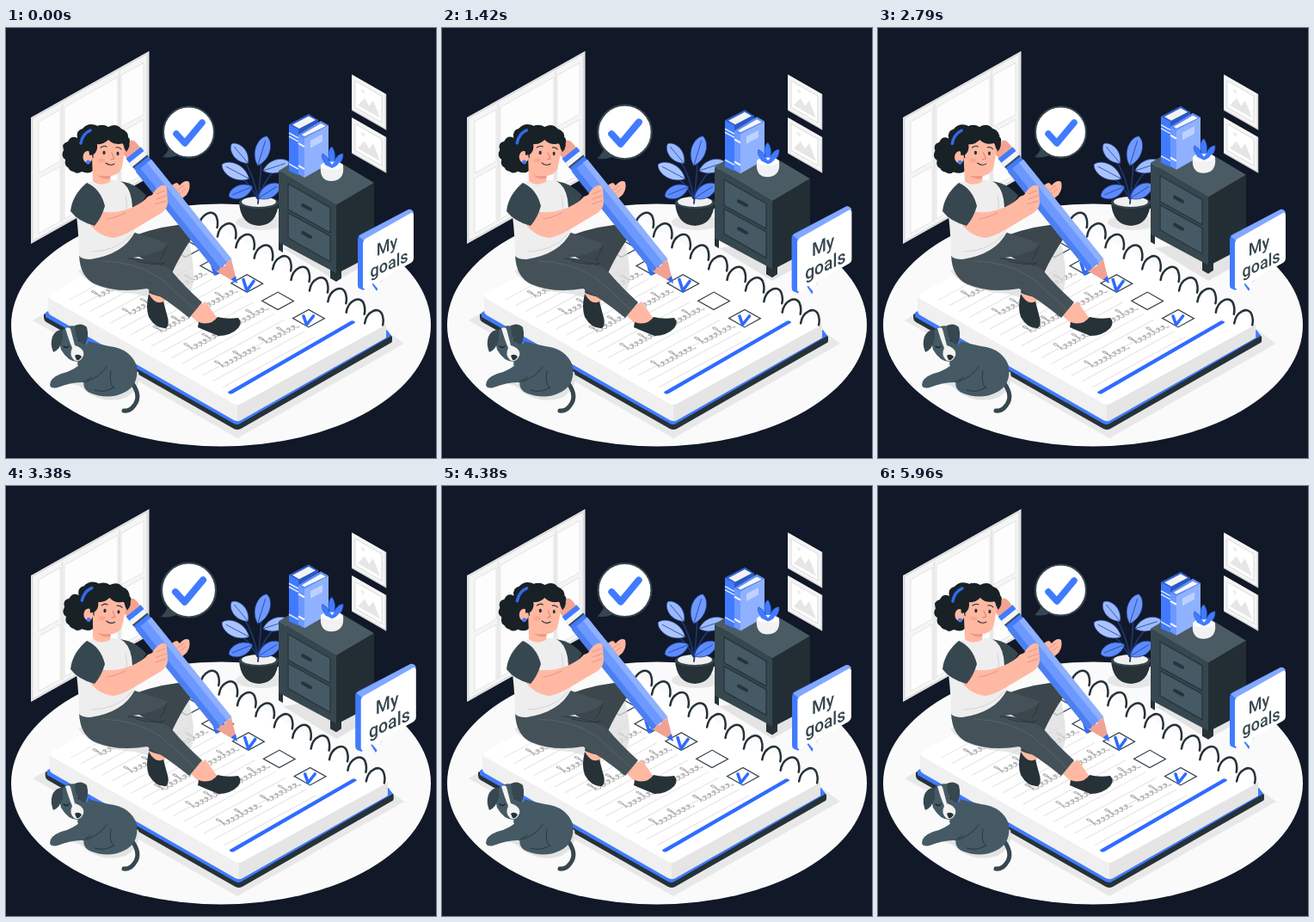
An HTML page that plays this animation: 500x500 px, repeating every 6000 ms.

```html
<!DOCTYPE html>
<html lang="en">
<head>
<meta charset="utf-8">
<title>My goals</title>
<style>
html, body { margin: 0; height: 100%; overflow: hidden; background: #111827; }
svg { display: block; width: 100vw; height: 100vh; }
.ln { fill: none; stroke-linecap: round; stroke-linejoin: round; }
.ink { fill: #263238; }
.slate { fill: #37474f; }
.skin { fill: #ffb9a3; }
.blue { fill: #407bff; }
.soft { fill: #ececec; }
.hair { fill: #182126; }
.dog { fill: #455a64; }
</style>
</head>
<body>
<svg viewBox="0 0 500 500">
  <ellipse cx="250" cy="345.500" rx="244" ry="141" fill="#fafafa"/>

  <!-- window -->
  <g transform="matrix(1 -.562 0 1 29 104)">
    <rect width="137.500" height="147" fill="#e3e3e3"/>
    <rect x="2" y="2" width="133" height="143" fill="#f5f5f5" stroke="#d2d2d2" stroke-width=".7"/>
    <g fill="#fdfdfd" stroke="#dedede" stroke-width=".8">
      <rect x="9" y="10" width="25" height="60"/><rect x="9" y="76" width="25" height="64"/>
      <rect x="39" y="10" width="62" height="130"/>
      <rect x="105" y="10" width="26" height="60"/><rect x="105" y="76" width="26" height="64"/>
    </g>
    <path d="M36.500 4v138M103 4v138" stroke="#e6e6e6" stroke-width="2"/>
  </g>

  <!-- wall pictures -->
  <defs>
    <g id="photo">
      <rect width="39.500" height="41" rx="1" fill="#f5f5f5"/>
      <path d="M0 41h39.500V0" fill="none" stroke="#d8d8d8" stroke-width="1.500"/>
      <rect x="4" y="5" width="31" height="31" fill="#fff" stroke="#dadada"/>
      <path d="M7 32l8-13 5 6 5-9 8 16z" fill="#e6e6e6"/><circle cx="13" cy="12" r="2" fill="#ececec"/>
    </g>
    <path id="ring" class="ln" d="M-11 6C-9-8 5-14 9-5C11 0 11 4 10 8" stroke="#263238" stroke-width="2.500"/>
  </defs>
  <use href="#photo" transform="matrix(1 .57 0 1 402 54)"/>
  <use href="#photo" transform="matrix(1 .57 0 1 402 104)"/>

  <!-- plant -->
  <ellipse cx="296" cy="226" rx="29" ry="9" fill="#e6e6e6"/>
  <path class="ink" d="M271 203Q273 229 294 230Q315 229 317 203z"/>
  <ellipse cx="294" cy="203" rx="23" ry="7" fill="#37474f"/>
  <ellipse cx="294" cy="202" rx="20" ry="6" fill="#f0f0f0"/>
  <path class="ln" d="M293 204Q296 175 297 152M293 199Q288 170 276 153M292 198Q285 182 270 171M294 198Q299 178 313 165" stroke="#1d3570" stroke-width="1.800"/>
  <g id="leaves" stroke="#1f3c86" stroke-width=".7"></g>

  <!-- cabinet, books and succulent -->
  <path d="M322 256L384 294L450 257L428 240z" fill="#e4e4e4"/>
  <g id="cabinet">
    <path class="ink" d="M317 245v13l5 3V250zM377 280v11l7 4 6-4V280zM422 255v14l6-3V250z"/>
    <path fill="#4a5b64" d="M317 166L361 140L428 180L384 206z"/>
    <path fill="#37474f" d="M317 166L384 206V285L317 249z"/>
    <path fill="#232e34" d="M384 206L428 180V263L384 286z"/>
    <g fill="#455a64" stroke="#27343a" stroke-width="1.300">
      <path d="M328 181L377 209V238L328 211z"/><path d="M328 215L377 242V272L328 244z"/>
    </g>
    <path class="ln" d="M345 206l9 5M345 238l9 5" stroke="#27343a" stroke-width="4"/>

    <path fill="#2e5ed2" d="M329 112L352 100L363 107L341 119z"/>
    <path fill="#f3f3f3" d="M333 112.500L352 102.500L360 107L341 117z"/>
    <path class="blue" d="M329 112L340 118V171L329 166z"/>
    <path fill="#2c58c4" d="M340 118L363 106V160L340 171z"/>
    <path d="M329 122l11 6M329 126l11 6M329 158l11 6" stroke="#dce7ff" stroke-width="1.500"/>
    <path fill="#5f8ff8" d="M340 124L366 108L375 113L347 128z"/>
    <path fill="#f7f7f7" d="M344 124L366 111L372 114L347 126z"/>
    <path fill="#6d98ff" d="M340 124L347 128V174L340 170z"/>
    <path fill="#8fb1ff" d="M347 128L375 113V158L347 174z"/>
    <path d="M340 134l7 4M340 160l7 4" stroke="#fff" stroke-width="2"/>
    <path fill="#bed2ff" d="M354 131L368 123.500V132L354 139.500z"/>

    <path class="blue" stroke="#2450b8" stroke-width=".6" d="M374 161Q365 151 368 146Q374 149 376 155Q373 141 379 138Q384 145 382 154Q386 146 392 146Q393 154 384 162z"/>
    <path fill="#f2f2f2" d="M366 160Q364 178 379 178Q394 177 392 160z"/>
    <ellipse cx="379" cy="160" rx="13" ry="4.500" fill="#fff"/>
    <path class="blue" d="M371 159Q368 153 371 152Q377 155 379 159Q383 153 388 153Q388 160 379 163z"/>
  </g>

  <!-- notebook -->
  <path fill="#e8e8e8" d="M31 340L62 322L440 350L463 367L269 477z"/>
  <g id="book">
    <path class="ink" d="M44 333L60 325L440 349L449 359V364Q449 366 446 367L273 466Q269 468 265 466L47 342Q44 340 44 337z"/>
    <path class="blue" d="M46 331L60 322L443 351L448 358L272 460Q269 462 265 460L46 336z"/>
    <path fill="#f0f0f0" d="M49 312V329Q49 332 52 334L265 456Q269 458 273 456L442 360V343z"/>
    <path fill="#e5e5e5" d="M269 436V457.500L273 456L442 360V343z"/>
    <path fill="#fff" d="M53 308L217 220Q222 217 227 220L440 340Q444 343 440 346L273 437Q269 439 265 437L52 315Q47 312 53 308z"/>
    <g id="page" transform="matrix(.878 -.477 .87 .494 49 312)"></g>
    <g class="ln" stroke="#2f6bff" stroke-width="3.600">
      <path d="M346 335l3.500 10 8-10"/><path d="M276 292.500l4 13 8-11"/><path d="M239 273l4 13 8-9"/>
    </g>
    <g id="rings"></g>
  </g>

  <!-- woman -->
  <path d="M84 282Q100 306 150 309L182 318L170 298L215 305Q222 290 213 250z" fill="#dcdcdc" opacity=".75"/>
  <path class="skin" d="M167 300L186 304L184 322L168 320z"/>
  <path class="ink" d="M166 309Q162 325 166 336Q174 350 186 349Q191 345 187 333L183 318Q174 323 166 309z"/>
  <path fill="#3b474d" d="M128 250Q165 233 200 229Q219 231 217 243Q202 265 193 285L187 313Q177 313 166 308L170 275z"/>
  <path class="skin" d="M212 332L232 318L246 338Q240 350 226 345z"/>
  <path class="ink" d="M224 342Q238 347 246 336Q257 339 270 337Q275 342 270 349Q261 358 247 358Q232 352 223 348z"/>
  <path fill="#455158" d="M85 264Q86 290 104 298Q130 309 164 303Q186 315 213 337L228 319Q206 299 193 283Q177 270 148 267Q180 262 189 251L150 238z"/>
  <path class="ln" d="M142 268Q165 270 182 276M151 271Q176 277 184 273M187 252Q184 263 179 270" stroke="#29353b" stroke-width="1"/>
  <path class="ln" d="M112 271Q150 272 178 290Q196 305 220 328" stroke="#5c6970" stroke-width=".8"/>

  <path class="slate" d="M130 178Q149 179 163 195L153 211L136 201z"/>
  <path class="skin" d="M158 203L165 196L190 187Q193 181 199 180L202 183Q208 176 213 179Q215 187 210 194Q202 202 189 203L168 215z"/>
  <path class="ln" d="M197 190l10-7M199 194l10-7" stroke="#e58f7c" stroke-width=".8"/>
  <path fill="#eeeeee" d="M91 181Q110 174 133 178Q143 183 146 199L150 237Q137 263 98 269Q88 269 85 265Q85 245 82 218z"/>
  <path class="ln" d="M146 240Q128 260 100 260M139 195Q142 210 139 217" stroke="#d5d5d5" stroke-width="1"/>

  <g transform="translate(140 135) rotate(51.200)">
    <path fill="#f3a391" d="M0-7Q2-10 8-10H14V10H8Q1 9 0 5z"/>
    <path class="blue" d="M13-11H38V11H13z"/>
    <path fill="#f4f4f4" d="M19-11H25V11H19z"/><path fill="#3f4e57" d="M25-11H27V11H25z"/>
    <path fill="#6c98ff" d="M32-11.500H181V11.500H32z"/>
    <path fill="#8eb0ff" d="M32-11.500H181V-5H32z"/>
    <path fill="#4c7ff0" d="M32 5H181V11.500H32z"/>
    <path fill="#f1a292" d="M180-11.500Q183-7 180-5Q184 0 180 5Q183 8 180 11.500L207 1z"/>
    <path fill="#2f6bff" d="M199-3L207 1L199 4z"/>
  </g>

  <path class="skin" d="M94 223Q105 242 125 244Q136 242 149 234L181 215Q188 210 188 202L187 188Q187 182 181 183Q174 186 170 194Q157 204 146 209Q126 217 108 213z"/>
  <path class="ln" d="M175 193l10-4M175 199l11-4M174 205l12-4M139 215Q127 221 118 222" stroke="#e58f7c" stroke-width=".9"/>
  <path class="slate" d="M94 180Q77 194 75 213Q84 225 103 230Q111 221 115 207Q110 187 94 180z"/>

  <g id="head">
    <path class="hair" d="M83 128Q76 124 72 132Q64 134 67 142Q63 149 69 153Q67 162 75 163Q81 172 88 167Q101 172 104 160L113 130Q114 119 107 114Q96 109 89 117Q81 119 83 128z"/>
    <path class="skin" d="M100 150L101 178Q109 185 121 179L122 169z"/>
    <path fill="#ee9984" d="M106 171Q115 174 122 170L121 175Q113 177 106 171z"/>
    <path class="skin" d="M101 134Q117 122 138 132Q138 150 134 164Q129 173 118 172Q106 171 102 159z"/>
    <ellipse class="skin" cx="95" cy="150" rx="5.500" ry="7"/>
    <circle class="blue" cx="95.500" cy="156" r="2.500"/>
    <path class="hair" d="M97 148Q94 125 103 116Q111 110 119 115Q128 110 134 117Q143 120 142 129Q146 137 140 144Q137 140 136 134Q126 137 119 130Q113 136 106 135Q107 143 102 147Z"/>
    <path class="ln" d="M87 134Q89 123 98 119" stroke="#3469e8" stroke-width="3.500"/>
    <g class="hair"><circle cx="73" cy="146" r="6"/><circle cx="79" cy="160" r="7"/><circle cx="139" cy="131" r="5"/><circle cx="110" cy="118" r="5"/></g>
    <ellipse class="ink" cx="114" cy="145" rx="1.600" ry="2.300"/><ellipse class="ink" cx="130" cy="146" rx="1.500" ry="2.200"/>
    <path class="ln" d="M110 139q4-3 7-1M128 139q4-1 6 2M116 157q5 4 10 1" stroke="#263238" stroke-width="1.100"/>
    <path class="ln" d="M123 145l3 7-4 1" stroke="#d9806e" stroke-width="1"/>
    <ellipse cx="111" cy="154" rx="4" ry="2.500" fill="#f79e8b" opacity=".6"/>
  </g>

  <!-- dog -->
  <path fill="#e3e3e3" d="M57 419Q82 408 93 423Q115 438 139 430Q158 419 154 400L110 385z"/>
  <path class="ln" d="M146 412Q158 428 149 439Q144 446 137 445" stroke="#37474f" stroke-width="5"/>
  <path class="dog" d="M88 362Q105 367 120 370Q145 373 152 393Q155 416 137 424Q119 433 97 424Q87 418 92 407L83 391z"/>
  <path class="dog" d="M91 386Q81 398 64 402Q51 407 51 415Q52 420 60 418Q77 411 91 412Q105 405 105 389z"/>
  <path class="ln" d="M94 411Q110 405 117 394M103 421Q115 425 125 418M122 399Q119 414 126 419M90 412l9-6" stroke="#2a373d" stroke-width="1"/>
  <path class="blue" d="M90 358Q97 359 96 365L91 371L87 367z"/>
  <path class="dog" d="M65 352Q73 344 83 347Q93 355 93 368Q93 386 83 388Q72 388 64 374Q61 363 65 352z"/>
  <path fill="#f2f2f2" d="M69 349Q74 347 75 350L80 369Q92 373 90 381Q86 390 79 386Q73 380 77 372Q73 363 69 349z"/>
  <path class="ink" d="M80 381Q84 378 88 382Q86 387 82 386z"/>
  <path class="ln" d="M67 370q3 3 6 0M84 363q3 2 5-1" stroke="#172025" stroke-width="1.200"/>
  <path class="slate" d="M66 351Q58 350 54 359Q51 367 55 377Q63 374 66 362z"/>
  <path class="slate" d="M80 346Q88 342 94 348Q97 360 92 368Q85 367 81 356z"/>

  <!-- speech bubbles -->
  <g id="tick">
    <path fill="#37474f" d="M191 136Q188 145 182 150Q195 152 202 146z"/>
    <circle cx="212.500" cy="121" r="29.500" fill="#fff" stroke="#37474f" stroke-width="2"/>
    <path class="ln" d="M198 123l10 11 20-24" stroke="#407bff" stroke-width="7.500"/>
  </g>
  <g id="goals">
    <path class="blue" d="M409 245Q409 242 412 240L468 211Q471 210 474 214L440 262L416 305L411 303Q409 302 409 299z"/>
    <path fill="#82a8ff" d="M410 242L468 211Q471 210 474 214L416 247z"/>
    <path class="blue" d="M425 297L431 306L437 293z"/>
    <path fill="#fff" d="M415 250Q415 247 418 245L471 215Q474 214 474 217V268Q474 271 471 273L437 292L433 304L427 297L418 303Q415 304 415 301z"/>
    <g font-family="Roboto, Inter, sans-serif" font-weight="500" font-size="20" fill="#37474f" text-anchor="middle">
      <text transform="matrix(.9 -.4 0 1 443 260)">My</text>
      <text transform="matrix(.9 -.4 0 1 445.500 281)">goals</text>
    </g>
  </g>
</svg>
<script>
const $ = id => document.getElementById(id);
const fill = (id, parts) => { $(id).innerHTML = parts.join(''); };

// x, y, half width, half length, angle, colour
fill('leaves', [
  [298, 143, 9, 18, 17, '#6f99ff'], [272, 146, 8, 15, -40, '#98b8ff'],
  [267, 167, 9, 18, -62, '#a9c4ff'], [273, 190, 8, 15, -112, '#5c8bff'],
  [314, 161, 8, 16, 72, '#9dbbff'], [306, 190, 8, 15, 58, '#5c8bff']
].map(([x, y, w, h, a, c]) =>
  `<g transform="translate(${x} ${y}) rotate(${a})">
    <path fill="${c}" d="M0 ${h}C${-w * 1.5} ${h * .3} ${-w} ${-h * .8} 0 ${-h}C${w} ${-h * .8} ${w * 1.5} ${h * .3} 0 ${h}"/>
    <path d="M0 ${h}V${-h * .7}"/></g>`));

function scribble(x, y, end) {
  let d = `M${x} ${y}`;
  for (let i = 0; x < end; i++, x += 6) {
    const h = i % 4 ? 5 : 13;
    d += `q5 ${-h} 2 ${-h}t1 ${h}q2 2 3 0`;
  }
  return `<path class="ln" d="${d}" stroke="#a9a9a9" stroke-width="1.1"/>`;
}

const page = [];
for (let i = 0; i < 16; i++) {
  const y = 18 + i * 13.7;
  page.push(`<path d="M10 ${y}H132" stroke="#dedede"/>`);
}
for (let i = 0; i < 5; i++) {
  const y = 32 + i * 41.2;
  page.push(scribble(34, y + 3, 82), scribble(92, y + 3, 130));
  page.push(`<rect x="139.500" y="${y - 10.5}" width="21" height="21" fill="#fff" stroke="#37474f" stroke-width="1.500"/>`);
}
page.push('<path class="ln" d="M9 235L175 230" stroke="#2f6bff" stroke-width="5"/>');
fill('page', page);

fill('rings', Array.from({ length: 10 }, (_, i) =>
  `<use href="#ring" x="${235.500 + i * 21.4}" y="${224 + i * 12.6}"/>`));

// Linear interpolation through [time, value] pairs
function along(keys, t) {
  const i = keys.findIndex(k => k[0] > t);
  const [t0, a] = keys[i - 1], [t1, b] = keys[i];
  return a + (b - a) * (t - t0) / (t1 - t0);
}

const BEAT = [[0, 0], [300, 1], [900, 0], [1200, 0], [1500, 1], [1800, 0], [3000, 0]];
const SWAY = [[0, 0], [750, 1], [2250, -1], [3000, 0]];
const DRIFT = [[0, 0], [600, -.6], [1100, .4], [1420, 0], [1750, -2.5], [2170, 1.7], [2350, 3],
  [2800, -3], [3380, 1.7], [3550, 2], [4080, -3], [4380, -2], [5130, -.5], [6000, 0]];

const move = (id, value) => $(id).setAttribute('transform', value);
const zoom = (id, x, y, s) => move(id, `translate(${x} ${y}) scale(${s}) translate(${-x} ${-y})`);

function draw(now) {
  const t = now % 6000, half = t % 3000;
  const beat = along(BEAT, half);
  zoom('tick', 212.5, 121, 1 + .08 * beat);
  zoom('goals', 441.5, 258, 1 + .1 * beat);
  move('head', `rotate(${3 * along(SWAY, half)} 117 182)`);
  move('cabinet', `translate(0 ${Math.abs(t - 3000) / 300 - 10})`);
  move('book', `translate(${along(DRIFT, t)} 0)`);
}

const start = performance.now();
(function tick() {
  draw(performance.now() - start);
  requestAnimationFrame(tick);
})();
</script>
</body>
</html>
```
